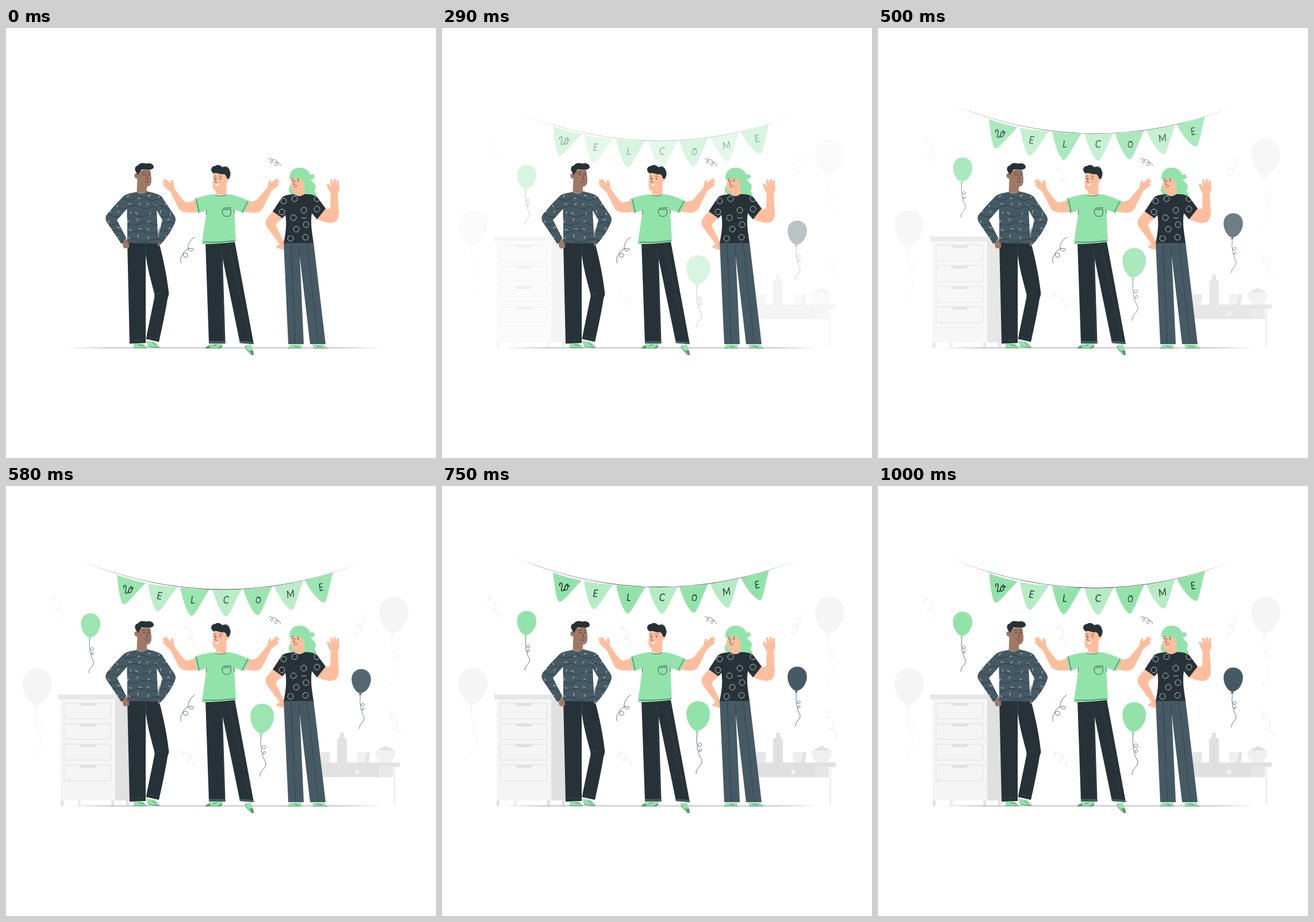
These frames come from a looping animation (748x748 px, 1040 ms). An HTML page with a canvas:

```html
<!DOCTYPE html>
<html lang="en">
<head>
<meta charset="utf-8">
<title>Welcome</title>
<style>
html, body { margin: 0; width: 100%; height: 100%; overflow: hidden; background: #fff; }
canvas { display: block; width: 748px; height: 748px; }
</style>
</head>
<body>
<canvas id="stage"></canvas>
<script>
const SIZE = 748, LOOP = 1040, FPS = 24, FRAMES = 25, DROP = 30;
const GREEN = '#92e3a9', MINT = '#b5ecc4', DARK = '#263238', SLATE = '#455a64';
const SKIN = '#ffbe9d', BROWN = '#a07866', G1 = '#f5f5f5', G2 = '#ebebeb', G3 = '#e0e0e0';

const canvas = document.getElementById('stage');
const c = canvas.getContext('2d');
const ratio = window.devicePixelRatio || 1;
canvas.width = canvas.height = SIZE * ratio;
c.lineCap = c.lineJoin = 'round';

function fill(color, d) {
  c.fillStyle = color;
  c.fill(new Path2D(d));
}

function line(color, width, d, dash = []) {
  c.strokeStyle = color;
  c.lineWidth = width;
  c.setLineDash(dash);
  c.stroke(new Path2D(d));
  c.setLineDash([]);
}

function box(color, x, y, w, h) {
  c.fillStyle = color;
  c.fillRect(x, y, w, h);
}

function dot(color, x, y, r) {
  c.fillStyle = color;
  c.beginPath();
  c.arc(x, y, r, 0, 7);
  c.fill();
}

function clipped(d, draw) {
  c.save();
  c.clip(new Path2D(d));
  draw();
  c.restore();
}

// Looping streamer between two points
function coil(color, width, x0, y0, x1, y1, turns, r, phase) {
  c.beginPath();
  for (let i = 0; i <= 80; i++) {
    const u = i / 80, a = phase + u * turns * Math.PI * 2;
    const k = r * Math.sin(Math.PI * Math.min(1, 0.12 + u * 0.8));
    c.lineTo(x0 + (x1 - x0) * u + k * Math.cos(a), y0 + (y1 - y0) * u + k * Math.sin(a));
  }
  c.strokeStyle = color;
  c.lineWidth = width;
  c.stroke();
}

function random(seed) {
  return () => (seed = seed * 16807 % 2147483647) / 2147483647;
}

// cubic-bezier(.36, -.01, .5, 1.38)
function ease(x) {
  const curve = (s, a, b) => 3 * (1 - s) * (1 - s) * s * a + 3 * (1 - s) * s * s * b + s * s * s;
  let lo = 0, hi = 1;
  for (let i = 0; i < 30; i++) {
    const mid = (lo + hi) / 2;
    if (curve(mid, 0.36, 0.5) < x) lo = mid; else hi = mid;
  }
  return curve(lo, -0.01, 1.38);
}

function balloon(x, y, s, color, thread) {
  c.save();
  c.translate(x, y);
  c.scale(s, s);
  line(thread, 0.7 / s, 'M-2 27C-1 35-4 43 0 46C5 49 7 43 3 42C-2 41-3 53 2 54C7 54 5 48 2 51C-3 58 6 63 5 69C4 76-4 78-3 86');
  fill(color, 'M0-17.5C10-17.5 16.8-10 16.8 0C16.8 11 9 23.5-1 24.5L1 27.5H-4.5L-2.5 24.5C-10 23-16.8 11-16.8 0C-16.8-10-10-17.5 0-17.5Z');
  c.restore();
}

function cabinet() {
  box(G3, 190, 371, 25, 176);
  box('#e6e6e6', 91, 362.5, 124, 8.5);
  box(G1, 95, 371, 95, 176);
  for (const x of [95, 183, 209]) box(G3, x, 547, 5, 9.5);
  box(G2, 125, 547, 5, 9);
  for (let i = 0; i < 4; i++) {
    const y = 377.5 + i * 35.9;
    line(G3, 1, `M101.5 ${y}H182.5V${y + 27.5}H101.5Z`);
    fill(G3, `M127 ${y}H158L154 ${y + 5}H131Z`);
  }
}

function table() {
  box('#efefef', 674, 488, 3, 68);
  box(G3, 545, 481, 140, 7.5);
  box(G3, 545, 488, 103, 18.5);
  box('#e6e6e6', 648, 488.5, 25, 18);
  dot(G1, 611, 497, 3.7);
  fill('#e6e6e6', 'M547 463H564L562 481H547Z');
  fill(G3, 'M581 429H588V437C592 439 593 441 593 445V481H576V445C576 441 577 439 581 437Z');
  fill('#efefef', 'M610 463H628L624 481H612Z');
  fill(G3, 'M628 463H633.5L631 481H624Z');
  fill(G3, 'M648 460C650 455 655 457 657 453C661 451 665 453 666 456C670 455 673 458 673 460Z');
  fill('#f0f0f0', 'M643 460H677C678 470 673 479 666 481H654C646 479 642 470 643 460Z');
}

function backdrop() {
  cabinet();
  table();
  balloon(54, 343, 1.49, G1, G2);
  balloon(674.5, 219, 1.5, G1, G2);
  coil(G3, 0.7, 79, 187, 98, 231, 2.5, 6, -1);
  coil(G3, 0.7, 310, 237, 326, 279, 2.5, 6, -1);
  coil(G3, 0.7, 622, 224, 609, 260, 3, 6, -0.5);
  coil(G3, 0.7, 303, 461, 331, 487, 3, 6, -1.5);
  coil(G3, 0.7, 667, 391, 685, 438, 2.5, 6, -1);
}

const flags = [
  [193, 152, 243, 166, 205, 203],
  [247, 167, 298, 173, 264, 215.5],
  [303, 174, 354, 177, 323, 223],
  [359, 177, 410, 177, 383, 224],
  [413, 177, 463, 172, 438, 222],
  [467, 171, 517, 162, 497, 213],
  [520, 161, 569, 148, 553, 200]
];
const letters = [
  ['E', 267, 188, 8], ['L', 325, 195, 3], ['C', 383, 195, 3],
  ['O', 439, 196, 0], ['M', 495, 185, -10], ['E', 548, 173, -13]
];

function bunting() {
  flags.forEach(([ax, ay, bx, by, tx, ty], i) => {
    c.fillStyle = i % 2 ? MINT : GREEN;
    c.beginPath();
    c.moveTo(ax, ay);
    c.quadraticCurveTo((ax + bx) / 2, (ay + by) / 2 + 2, bx, by);
    c.bezierCurveTo(bx + (tx - bx) * 0.45, by + (ty - by) * 0.45, tx + 6, ty, tx, ty);
    c.bezierCurveTo(tx - 6, ty, ax + (tx - ax) * 0.25, ay + (ty - ay) * 0.5, ax, ay);
    c.fill();
  });
  // Rope, thinning out towards both ends
  fill(DARK, 'M127 126Q372 225.2 617 131Q372 226.8 127 126Z');
  c.fillStyle = DARK;
  c.font = '18px Lato, sans-serif';
  c.textAlign = 'center';
  for (const [ch, x, y, turn] of letters) {
    c.save();
    c.translate(x, y);
    c.rotate(turn * Math.PI / 180);
    c.transform(1, 0, -0.08, 1, 0, 0);
    c.scale(ch === 'O' ? 0.68 : 0.85, ch === 'O' ? 0.85 : 1);
    c.fillText(ch, 0, 6.5);
    c.restore();
  }
  line(DARK, 1.2, 'M437 190Q439 193 442 191');
  line(DARK, 1.5, 'M205 175C203 171 208 168 209 172C210 177 205 184 209 184C212 184 214 178 215 174C213 179 212 184 215 183C219 182 221 174 218 172C215 173 217 178 222 175');
}

const sweater = 'M227 285C222 287 210 287 204 293C194 303 180 318 174.5 326C172.5 330 173 334 175.5 338L201 376L209.5 366L193 334L211 314V374L265 375L262 317L272 334L263.5 367L268 377C275 371 288 354 294 338C296 333 295 329 292 325L272 295C268 289 260 288 246 284C240 289 233 289 227 285Z';

function knit() {
  for (let i = 0; i < 6; i++) {
    let d = '';
    for (let x = 170; x <= 300; x += 3) {
      d += (d ? 'L' : 'M') + x + ' ' + (297 + i * 14.5 + 2.8 * Math.sin(x / 6.5 + i * 1.7));
    }
    line(DARK, 0.7, d);
  }
  const rnd = random(77);
  for (let y = 291; y < 376; y += 14) {
    for (let x = 176; x < 298; x += 17) {
      const a = rnd() * 3.1, px = x + rnd() * 8, py = y + rnd() * 5;
      const dx = 2 * Math.cos(a), dy = 2 * Math.sin(a);
      line('#fff', 0.8, `M${px - dx} ${py - dy}L${px + dx} ${py + dy}`);
    }
  }
}

function leftMan() {
  fill(GREEN, 'M222 549H238L245 555V557H222ZM244 544L258 546L267 553V556L247 554Z');
  line(DARK, 0.6, 'M222 556.5H245M231 551L240 553M247 554L266 556M255 548L261 552');
  fill(DARK, 'M211 372L266 373C272 395 280 430 283 459C284 464 282 467 281 471C278 490 272 520 266 546L243.5 541C248 518 254 490 258.5 467C258.5 464 258 461 257 458C251 436 246 416 243 395V548L215 549Z');
  line(SLATE, 0.7, 'M260 463L270 461M244 376L243 395');
  line(SLATE, 0.6, 'M215 543L243 542M245 536L268 541', [2, 1.5]);
  fill(BROWN, 'M203 372L210 367L214 373V382L206 383.5C203 381 203 376 203 372ZM264 366L268 373V378L264.5 380Z');
  fill(BROWN, 'M229 248L250 245C252 252 253 258 253 265C253 272 250 276 245 276V285C240 289 232 288 227.5 285L228.5 262C224 262 222 257 224 254C226 252 229 253 229 255Z');
  fill(DARK, 'M229 256L226 250C223 246 224 240 230 239C231 235 239 234 244 236C250 234 257 237 257 242C256 246 251 247 246 246L236 246C233 248 232 253 229 256Z');
  line(DARK, 0.7, 'M234 239C234 236 236 235 238 236M244.5 255L247 263L244 263.5M241 267Q245 270 248 267M237 251.5Q240 250 242 251.5M247 251.5L250 251');
  dot(DARK, 240, 255, 1.1);
  dot(DARK, 249, 255, 1.1);
  fill(SLATE, sweater);
  clipped(sweater, knit);
  line(DARK, 0.7, 'M211 314V330M262 317L261 305M263 367L267 348');
}

function middleMan() {
  fill(GREEN, 'M354 550L376 549V554L372 557H347C347 554 352 552 354 550ZM415 552L426 551C429 558 431 564 431 569H428C422 564 417 560 415 552Z');
  fill('rgba(38,50,56,.45)', 'M347 557Q349 553 356 553L354 557ZM423 561L430 561L431 569H428ZM368 557L376 552V554L372 557Z');
  line(DARK, 0.6, 'M347 557H372L376 554M416 554C418 560 423 565 428 569M360 553L366 551');
  fill(DARK, 'M347 374L398 372L431 550L407 548L377 402L381.5 549H353Z');
  fill(SLATE, 'M353 544.5H381.5V549H353ZM406 544L430 546L431 550L407 548Z');
  line(SLATE, 0.6, 'M375 385L379 542M388 376L424 543M350 380Q357 382 360 376', [2, 2]);
  fill(SKIN, 'M329 300C320 301 316 306 311 302C303 294 298 286 292 277C293 271 291 265 289 264C286 264 287 269 286 271L279 263C276 261 275 263 277 266L275 264C271 264 273 268 276 271L273 269C272 273 276 276 278 278C282 283 285 283 287 287L300 313C303 319 312 323 333 320Z');
  fill(SKIN, 'M423 302C432 302 436 300 440 295L455 277C456 270 457 264 460 265C462 266 460 269 461 270L470 262C474 261 473 265 471 267L474 264C477 265 474 269 472 271L474 271C476 274 470 277 467 279L461 284L447 313C441 323 432 323 415 319Z');
  fill(SKIN, 'M361 250L385 249L384.5 258C390 258 390 266 385 267L383.5 270V289C378 292 369 291 365 288V283C360 282 359 276 359.5 268Z');
  fill(DARK, 'M359 251C355 247 357 240 364 240C367 237 373 238 376 242C382 240 389 243 389 248C392 252 390 259 388 262L384 262C384 257 381 255 379 254C374 256 369 252 365 252C362 253 360 253 359 251Z');
  line(DARK, 0.7, 'M380 242C382 240 384 240 386 242M366 261L363.5 268L367 268.5M361 258L365 257.5M371 258Q373 256.5 376 258.5');
  dot(DARK, 363.5, 261.5, 1.1);
  dot(DARK, 373, 262, 1.1);
  fill('#fff', 'M363.5 271Q367 273 371 270.5Q370 275 366 275Z');
  fill(GREEN, 'M361 289C352 290 340 293 327.5 297L333 322.5L349 317L340.5 376Q370 376 400 372L397 316L414 322L425 302C412 296 400 290 384 289C378 293 367 293 361 289Z');
  line(DARK, 0.8, 'M331 298L336 320M421 301L411 320M344 372.5Q370 374 398 370M349 317L348 324M397 316L397 322M364 290.5Q373 294 382 290.5');
  line(DARK, 0.8, 'M378 313.5L391 312.5M376.5 316L391 315V324Q389 328 384 328Q377 327 376.5 322Z');
}

const tee = 'M501 289C492 290 484 290 479 296L464 319L481 331L486 325C489 342 486 360 483 374H535C533 358 529 342 532 322L541 333L556 314L542 295C537 290 530 289 519 289C513 294 506 293 501 289Z';
const rings = [[483, 301], [502, 297], [480, 320], [500, 330], [518, 317], [541, 315], [522, 342], [505, 350], [495, 366], [521, 364], [541, 297]];

function woman() {
  fill(GREEN, 'M495 551H514V557H491Q491 553 495 551ZM533 551H553L559 557H535Z');
  line(DARK, 0.6, 'M491 557H514M535 557H559M502 553L508 555M541 553L549 555');
  fill(SKIN, 'M465 318L453 332C450 338 452 344 455 348L476 376L470 380C469 383 474 383 476 384L483 386L484 374L470 345C469 340 474 336 482 331Z');
  fill(SKIN, 'M555 314C559 314 562 317 564 312L565 288C561 281 558 275 558 271C560 269 563 273 565 276L564 265C565 262 568 263 568 266L569 271L570 264C571 261 574 262 574 265V272L576 265C579 263 580 266 579 270L580 281L577 287L579 322C579 334 573 340 562 339C555 338 548 336 541 332Z');
  fill(GREEN, 'M496 272C490 279 490 287 498 290H505V274ZM510 243C521 243 528 249 529 256C531 253 536 254 537 258C537 262 533 264 530 263C532 268 539 271 539 276C539 281 535 282 538 286C542 290 541 297 536 298H518V268Z');
  fill(SKIN, 'M496 262L518 261C520 275 518 285 520 290C513 296 505 294 501 290L503 285C498 285 495 281 495 276Z');
  fill(GREEN, 'M493 264C492 250 500 243 510 243C522 243 530 252 530 264L520 280C519 270 517 264 512 262C505 261 499 262 493 264Z');
  line(DARK, 0.7, 'M503 265L500 272L503 272.5M501 276Q505 277 507 273.5M497 262.5L500 262M506 262.5L510 263');
  dot(DARK, 499, 265.5, 1.1);
  dot(DARK, 508, 266, 1.1);
  fill(SLATE, 'M483 373H535L556 550H529L511 397L518 550H491Z');
  line(DARK, 0.6, 'M496 376L503 548M524 376L543 548M511 397L510 380');
  fill(DARK, tee);
  clipped(tee, () => {
    for (const [x, y] of rings) {
      c.beginPath();
      c.arc(x, y, 5, x, x + 5.9);
      c.strokeStyle = '#e8eaeb';
      c.lineWidth = 0.8;
      c.stroke();
    }
    line('#e8eaeb', 0.8, 'M514 330Q518 332 522 330');
  });
}

function people() {
  fill(DARK, 'M107 556.5L180 556.15H580L657 556.5L580 556.85H180Z');
  leftMan();
  middleMan();
  woman();
  line(DARK, 0.7, 'M328 364C320 368 316 378 317 384C318 389 326 389 326 385C325 382 316 383 311 388C306 393 308 399 313 399C318 398 317 390 311 392C304 395 302 404 305 409');
  coil(DARK, 0.6, 458, 229, 477, 239, 2.7, 4.3, -2.4);
}

function paint(time) {
  const t = time % LOOP;
  let step = 0;
  while (Math.round((step + 1) * 100 / FPS) * 10 <= t) step++;
  const e = step < 3 ? 0 : ease((step + 1) / FRAMES);
  c.setTransform(ratio, 0, 0, ratio, 0, 0);
  c.globalAlpha = 1;
  box('#fff', 0, 0, SIZE, SIZE);
  c.globalAlpha = Math.min(1, e);
  if (e > 0) {
    backdrop();
    c.save();
    c.translate(0, DROP * (1 - e));
    bunting();
    balloon(147.3, 236.3, 1, GREEN, DARK);
    balloon(618, 333.3, 1, SLATE, DARK);
    balloon(445.7, 397.5, 1.22, GREEN, DARK);
    c.restore();
  }
  c.globalAlpha = 1;
  people();
}

const start = performance.now();
function tick() {
  paint(performance.now() - start);
  requestAnimationFrame(tick);
}
tick();
</script>
</body>
</html>
```
